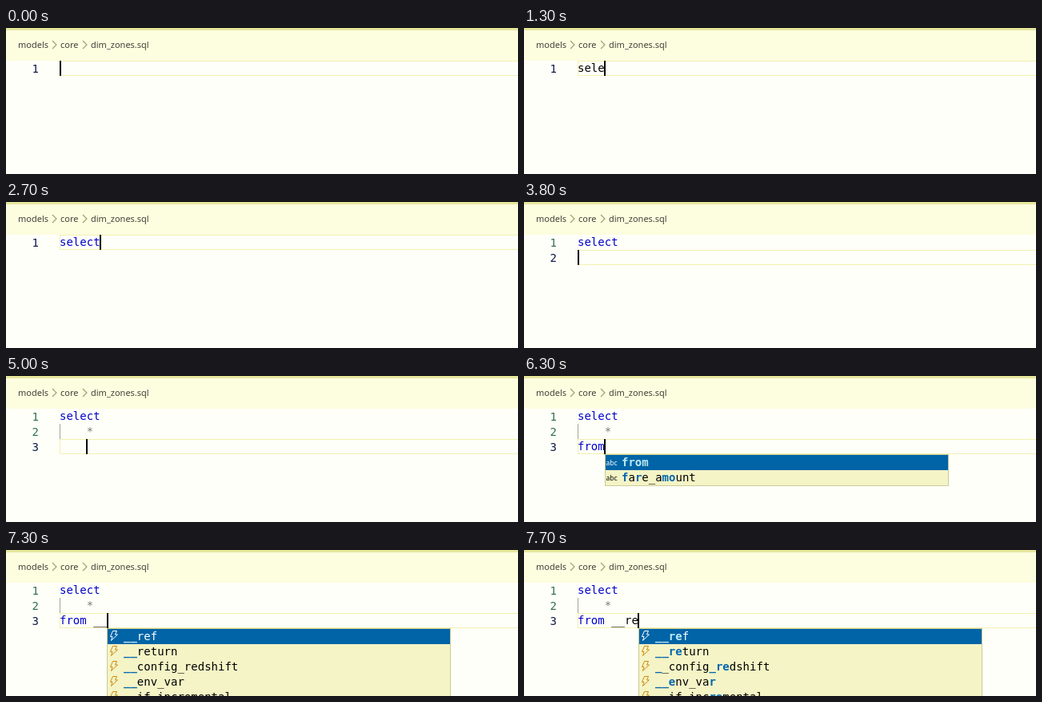
Recreate the animation shown at these times as an HTML page. Size 640 px wide and 183 px high, loop 8000 ms.

```html
<!DOCTYPE html>
<html lang="en">
<head>
<meta charset="utf-8">
<title>Typing a query</title>
<style>
  html, body { margin: 0; width: 100%; height: 100%; overflow: hidden; background: #fffff9; }
  svg { display: block; }
  text { font: 14px "DejaVu Sans Mono", monospace; white-space: pre; }
  .crumb { font: 11px "Noto Sans", sans-serif; fill: #424236; }
  .abc { font: 8.5px "Noto Sans", sans-serif; }
  .keyword { fill: #0000cd; }
  .star { fill: #7c7c74; }
  .number { fill: #2f6e55; text-anchor: end; }
  .number.active { fill: #0b1a48; }
  .match { font-weight: bold; fill: #0066b0; }
  .selected { fill: #fff; }
  .selected .match { fill: #bdeaf4; }
  .line { fill: none; }
</style>
</head>
<body>
<svg width="640" height="183" viewBox="0 0 640 183">
  <rect width="640" height="41" fill="#fdfde0"/>
  <rect width="640" height="3" fill="#e6e69c"/>
  <text class="crumb" x="15" y="25">models</text>
  <text class="crumb" x="68" y="25">core</text>
  <text class="crumb" x="106" y="25">dim_zones.sql</text>
  <path class="line" stroke="#a0a07c" stroke-width="1.2" d="M58 16l5 5-5 5M96 16l5 5-5 5"/>
  <g id="editor"></g>
</svg>
<script>
const LEFT = 67, TOP = 41, ROW = 19, CHAR = 8.43, LOOP = 8000;
const editor = document.getElementById('editor');

// Square brackets mark the matched letters.
const selectList = ['[select]'];
const fromList = ['[from]', '[f]a[r]e_a[mo]unt'];
const macros = ['__ref', '__return', '__config_redshift', '__env_var', '__if_incremental'];
const prefixList = macros.map(name => name.replace('__', '[__]'));
const rList = prefixList.map(name => name.replace('r', '[r]'));
const refList = ['[__re]f', '[__re]turn', '[_]_config[_re]dshift', '[__e]nv_va[r]', '[__]if_inc[re]mental'];

// Each state: start time, text, cursor shown, suggestions.
const body = 'select\n    *\n';
const states = [
  [0, '', true], [300, '', false], [800, '', true],
  [1000, 's', true], [1100, 'se', true], [1200, 'sel', true], [1300, 'sele', true],
  [1600, 'selec', true], [1700, 'select', true, selectList], [2200, 'select', false, selectList],
  [2700, 'select', true], [3200, 'select', false],
  [3800, 'select\n', true], [4000, 'select\n    ', true], [4500, 'select\n    ', false],
  [4800, 'select\n    *', true], [5000, body + '    ', true], [5500, body, true],
  [6000, body + 'f', true], [6100, body + 'fr', true], [6200, body + 'fro', true],
  [6300, body + 'from', true, fromList], [6600, body + 'from ', true],
  [7100, body + 'from _', true], [7200, body + 'from __', true],
  [7300, body + 'from __', true, prefixList],
  [7600, body + 'from __r', true, rList], [7700, body + 'from __re', true, refList]
];

const rect = (x, y, w, h, paint) => `<rect x="${x}" y="${y}" width="${w}" height="${h}" ${paint}/>`;
const text = (x, y, content, cls = '') => `<text x="${x}" y="${y}" class="${cls}">${content}</text>`;
const span = (cls, content) => `<tspan class="${cls}">${content}</tspan>`;
const bolt = (x, y, color) => `<path class="line" transform="translate(${x} ${y})" stroke="${color}"
  d="M7.5 2.5h5l-2 4.500h3L5.500 14.500l1.500-5H4.500z"/>`;

function drawLine(line, i, active) {
  const y = TOP + i * ROW;
  const code = line
    .replace(/\b(select|from)\b/, word => span('keyword', word))
    .replace('*', span('star', '*'));
  const frame = active
    ? rect(LEFT + .5, y + .5, 580, ROW - 1, 'class="line" stroke="#f1f1b0"')
    : line.startsWith(' ') ? rect(LEFT, y, 1, ROW, 'fill="#a4a490"') : '';
  return frame + text(41, y + 15, i + 1, active ? 'number active' : 'number') + text(LEFT, y + 14, code);
}

function drawPopup(items, x, y) {
  let out = rect(x + .5, y + .5, 429, items.length * ROW + 1, 'fill="#f4f4c6" stroke="#cbcb98"');
  items.forEach((item, i) => {
    const top = y + 1 + i * ROW, selected = i === 0;
    if (selected) out += rect(x + 1, top, 428, ROW, 'fill="#0064a6"');
    out += item.startsWith('[_')
      ? bolt(x, top, selected ? '#fff' : '#cf8a10')
      : text(x + 1.5, top + 13, 'abc', selected ? 'abc selected' : 'abc');
    const label = item.replace(/\[(.*?)\]/g, (_, part) => span('match', part));
    out += text(x + 21, top + 14, label, selected ? 'selected' : '');
  });
  return out;
}

function draw([, content, cursor, items]) {
  const lines = content.split('\n'), last = lines.length - 1;
  const x = LEFT + lines[last].length * CHAR, y = TOP + last * ROW;
  let out = lines.map((line, i) => drawLine(line, i, i === last)).join('');
  if (cursor) out += rect(Math.floor(x), y, 2, ROW, 'fill="#000"');
  if (items) out += drawPopup(items, Math.round(x), y + ROW);
  editor.innerHTML = out;
}

const start = performance.now();
let shown;
function tick() {
  const time = (performance.now() - start) % LOOP;
  const state = states.findLast(([at]) => at <= time);
  if (state !== shown) draw(shown = state);
  requestAnimationFrame(tick);
}
tick();
</script>
</body>
</html>
```
